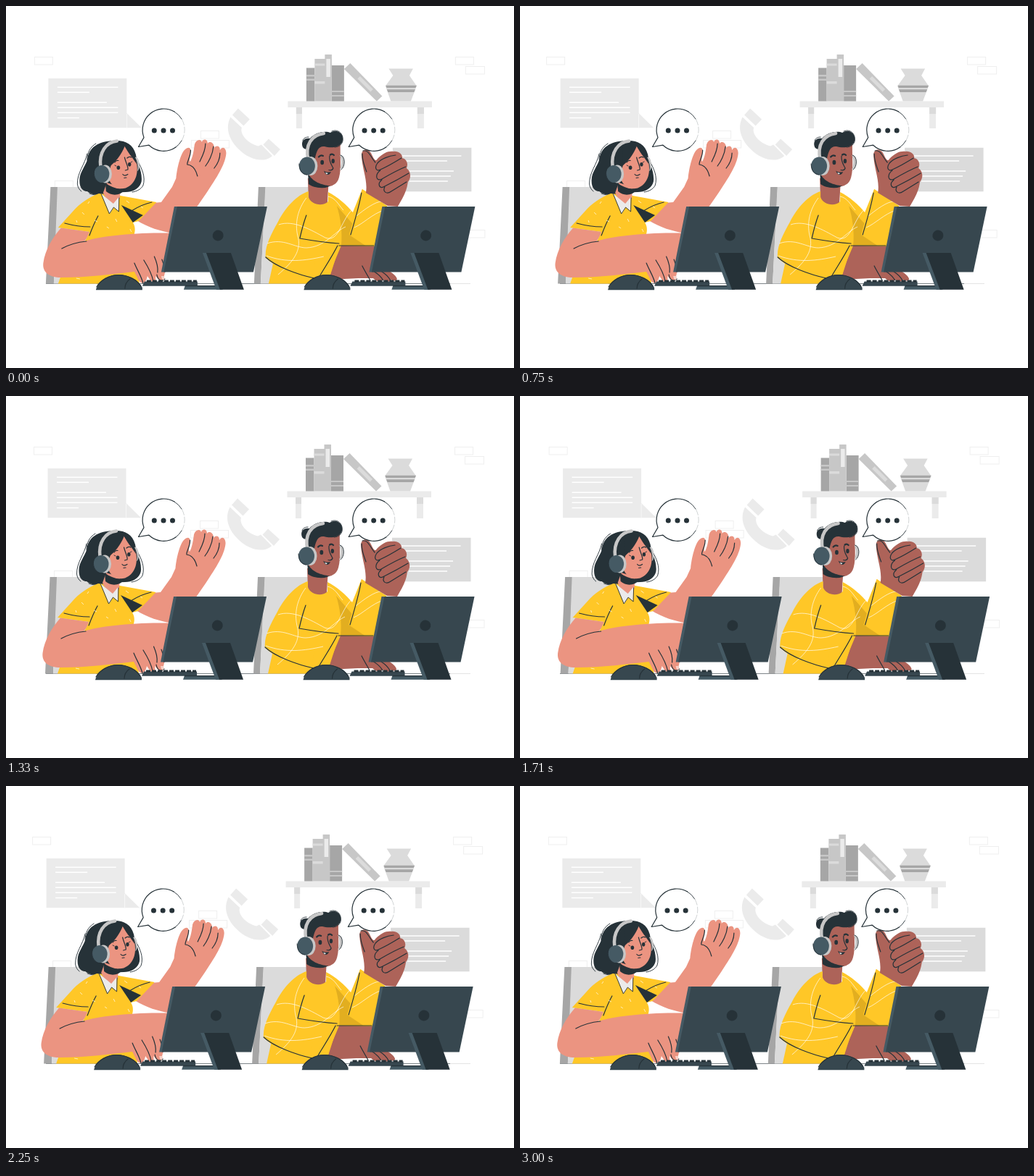
An HTML page for the animation above (3040 ms loop, 700 by 500 pixels).

```html
<!DOCTYPE html>
<html lang="en">
<head>
<meta charset="utf-8">
<title>Call center</title>
<style>
html, body { margin: 0; width: 100%; height: 100%; overflow: hidden; background: #fff; }
svg { display: block; width: 700px; height: 500px; }
.lite { fill: #ebebeb; } .pale { fill: #dbdbdb; } .mid { fill: #c7c7c7; } .grey { fill: #a6a6a6; }
.dark { fill: #263238; } .slate { fill: #37474f; } .steel { fill: #455a64; }
.sun { fill: #ffc727; } .peach { fill: #eb9481; } .brown { fill: #ad6359; }
.line { fill: none; stroke: #263238; stroke-width: 1.2; stroke-linecap: round; stroke-linejoin: round; }
.thin { stroke-width: .9; }
.rule { fill: none; stroke: #fff; stroke-width: 1.4; }
.thread { fill: none; stroke: #fff; stroke-width: .9; opacity: .75; }
.band { fill: none; stroke: #c7c7c7; stroke-width: 4.5; stroke-linecap: round; }
.box { fill: none; stroke: #efefef; }
</style>
</head>
<body>
<svg viewBox="0 0 700 500">
<defs>
  <g id="desk">
    <path class="slate" d="M191 380.5H264V386.7H188Z"/>
    <path d="M194 380H263" stroke="#263238" stroke-width="3" stroke-dasharray="6 2"/>
    <path class="steel" d="M247 386H297V391.800H245Z"/>
    <path class="dark" d="M247 386H294V387.2H247Z"/>
    <path class="steel" d="M232 277H238L220 367.5H214Z"/>
    <path class="slate" d="M236 277H360L341 367.5H217.500Z"/>
    <path class="steel" d="M271 341H279L299 391.800H290Z"/>
    <path class="dark" d="M276 341H310L328 391.800H295Z"/>
    <ellipse class="dark" cx="292.300" cy="317" rx="7.600" ry="7.300" transform="rotate(-35 292.300 317)"/>
    <path class="slate" d="M124 392.300C126 382 140 371 155 371C169 371 183 379 188 389V392.300Z"/>
    <path class="line" d="M125 388C130 379 142 371.500 155 371.500C168 371.500 181 378 186 387M171 377C167 380 164 385 164 390"/>
  </g>
  <g id="talk">
    <path d="M190 181.600L182.500 194.500L197 192.200A29.200 29.200 0 1 0 190 181.600Z" fill="#fff"/>
    <path d="M242 186A29.200 29.200 0 0 0 242 156" fill="none" stroke="#c4c8ca" stroke-width=".8" stroke-dasharray="9 2"/>
    <path class="line thin" d="M242 156A29.200 29.200 0 0 0 232 146M242 186A29.200 29.200 0 0 1 234 195"/>
    <path class="line" d="M232 146A29.200 29.200 0 0 0 190 181.600L182.500 194.500L197 192.200A29.200 29.200 0 0 0 234 195"/>
    <g class="dark"><circle cx="204.300" cy="172" r="3.500"/><circle cx="217" cy="172" r="3.500"/><circle cx="229.500" cy="172" r="3.500"/></g>
  </g>
</defs>

<path d="M55 383.500H612" stroke="#70787c" stroke-width=".9"/>
<path d="M612 383.500H640" stroke="#ddd" stroke-width=".8"/>

<g id="scene">
  <g id="frames"></g>
  <path class="lite" d="M58.500 100H166.500V148L187 168.300H58.500Z"/>
  <path d="M166.500 149V168" stroke="#fff" stroke-width=".6"/>
  <path class="rule" d="M71 112.300H154.500M71 119.300H115M71 133.300H139M71 140.300H154.500M71 147.300H154.500M71 154.500H101"/>
  <path class="pale" d="M533 195.800H641.500V256.300H533Z"/>
  <path class="rule" d="M544 207H627.500M544 214H608M554 228H617M554 235H613M556 242H609"/>

  <path class="lite" d="M388.500 131.500H587V140H576V169H567V140H408V169H400V140H388.500Z"/>
  <path class="pale" d="M400 140H408V149H400ZM567 140H576V149H567Z"/>
  <path class="grey" d="M414 85.500H425.500V131.500H414ZM449 82H466V131.500H449Z"/>
  <path class="mid" d="M414 95H425.500V97.500H414ZM414 100.500H425.500V103H414ZM449 117H466V119H449ZM449 123H466V125H449ZM425.500 73H439.500V131.500H425.500ZM439.500 67H449V131.500H439.500Z"/>
  <path class="pale" d="M425.500 79.500H439.500V82.500H425.500ZM425.500 104H439.500V107.500H425.500Z"/>
  <path class="lite" d="M441.500 73H447V98H441.500Z"/>
  <path class="mid" d="M474.500 79L518.500 124.500L511 131.500L466 87Z"/>
  <path class="pale" d="M488 97L506 115L502.500 118.500L484.500 100.500Z"/>
  <path class="pale" d="M527.500 86.500H561L556 96L566 110.500L558 131.500H530.500L523 110.500L533.500 96Z"/>
  <path class="grey" d="M523.500 109.800H566L564.500 113H524.500ZM525 115.300H564L562.500 119H526.500Z"/>

  <g class="lite">
    <path d="M320 141.500L336 156.500L327.500 165.500L312 150.500Z"/>
    <path d="M309.500 153.500L325 168C322 177 333 190 348 193.500L352 191.500L367 207C359 216 337 215 320 197C307 184 302 168 309.500 153.500Z"/>
    <path d="M362 183.500L378 198L370 207L354.500 191.500Z"/>
  </g>

  <path class="grey" d="M61.500 250H72L66 383.500H55ZM348 250H358L351 383.500H342Z"/>
  <path class="pale" d="M71 250H125V383.500H66ZM357.500 250H420V383.500H351Z"/>

  <!-- woman -->
  <g>
    <path class="dark" d="M149 186C127 187 114 195 112 213C109 222 101.500 230 101.500 240C101 251 106 256 112 256C119 262 132 262 141 258L165 257C178 257 188 249 187 238C187 226 181 218 179 205C175 190 164 185 149 186Z"/>
    <path class="line thin" d="M112 204C109 219 98 230 98.500 246C99 250 101 254 104 256M182 215C187 224 193 236 189 248C186 253 181 256 174 257M115 259C125 263 137 261 143 257M124 190C116 195 112 202 112 213"/>
    <path class="peach" d="M178 274L214 271L229 250L234.500 238C236 222 241 204 246 199C251 194 255 195 254.500 201C254 207 252 212 254 215C258 208 259 198 260 191C262 184 269 183 270 188C271 183 278 183 278 190C280 186 287 188 287 196C290 192 295 193 295 199C299 192 304 197 303.500 204C302 220 290 239 262 279L230 314C213 311 196 306 180 296Z"/>
    <path class="line" d="M254.500 199C255 208 249 215 250 219C258 220 262 227 264 235M275 190C275 200 270 209 267 215M286 194C285 205 279 216 275 221M295 203C295 211 291 219 287 224"/>
    <path class="sun" d="M128 259C115 264 102 272 92 284L72 306L115 312L108 327L76 372L72 383.500H184L176 318C179 310 178 304 175 299L183 297L207.500 271L158 262Z"/>
    <path class="dark" d="M159 275L189 289L175 299Z"/>
    <path class="line" d="M127 290C122 299 118 309 115 317M81 300C92 303 104 305 116 305M173 283C181 278 192 273 201 271"/>
    <path class="thread" d="M105 285L108 288M122 296L126 298M151 294L153 298M166 269L170 272M171 308L173 312M97 296L98 299M139 305L142 307M113 273L115 270M186 277L189 279M97 376L102 377M136 377L139 379"/>
    <path class="peach" d="M139 244L158 250L157 266L145 280L134 258Z"/>
    <path class="dark" d="M137 244C144 250 154 254 165 252C160 261 147 264 138 256Z"/>
    <path class="lite" d="M131 259L143 287L148.500 278L155 283L155.500 264L148 273Z"/>
    <path class="line thin" d="M131 259L142.500 287L148.500 278L155.500 284L156 265"/>
    <path class="peach" d="M145 219C153 211 158 201 163 193C169 203 177 207 180 216C183 231 179 246 165 251.500C153 255 142 247 141 234Z"/>
    <path class="dark" d="M144 188C158 185 173 188 176 202C178 208 180 214 180 218C174 208 167 202 164 193C159 206 151 215 144 221Z"/>
    <path class="line" d="M150 216C151 214 153 213 155 213.500M167 210C169 208 172 208 173 209M163.500 209C165 216 169 222 168 226L164.500 227M161 232.500C163 235 166 234 168 232.500M163 237.500L166 237"/>
    <g class="dark"><ellipse cx="155" cy="223.300" rx="2.300" ry="2.800"/><ellipse cx="170.300" cy="218.800" rx="2.200" ry="2.800"/></g>
    <path class="line thin" d="M152 221L150 220M172 216L174 215"/>
    <path class="band" d="M130.500 222C128 202 138 188 153 186.500"/>
    <path class="mid" d="M178 209C184 206 186 226 181 228C183 222 181 214 178 209Z"/>
    <ellipse class="mid" cx="137" cy="232" rx="9" ry="12.500"/>
    <ellipse class="steel" cx="132" cy="232" rx="10.500" ry="12"/>
    <path class="line thin" d="M122 226C120 234 123 241 129 244"/>
    <path class="peach" d="M76 306.500L115 312C113 318 111 321 108 325C130 318 182 312 232 314L218 373C220 380 212 382 208 375L206 373C208 383 202 384 197 376L195 373C193 384 186 386 182 377L177 367C149 370 113 375 76 375C60 375 50 368 51.500 355C54 337 64 320 76 306.500Z"/>
    <path class="line" d="M77 335C88 329 101 326 111 325M177 355C181 365 187 374 189 383M190 351C195 359 201 369 203 380M204.500 346C208 354 210 361 209 368M215 350L218 359M208 371C209 378 215 382 219 377"/>
    <path d="M214 373L218 373L218 379L215 377Z" fill="#f7d1c7"/>
  </g>

  <!-- man -->
  <g>
    <path class="brown" d="M416 238H445L443 272C435 278 424 275 417 267Z"/>
    <path class="dark" d="M417 233L444 246V250C434 253 422 250 417 246Z"/>
    <path class="sun" d="M417 256C401 261 385 278 375 298C365 316 356 333 358 348L368 356L362 383.500H432L508 332L525 276L491 253L478 285C470 275 456 263 444 257L444 270C436 278 420 274 417 264Z"/>
    <path d="M456 276L504 331H462C464 312 461 292 456 276Z" fill="#e2ae20"/>
    <path class="sun" d="M491 253L525 276L514 331L497 332L473 316Z"/>
    <path class="brown" d="M460 331L512 332L506 364L528 366C533 369 538 373 539 377C538 381 533 379 530 378C530 382 524 381 520 378C517 382 511 381 506 376L486 376L445 378Z"/>
    <path class="sun" d="M462 331L440 383.500H420L430 332Z"/>
    <g class="thread">
      <path d="M376 302C396 295 420 309 440 320C460 328 462 292 480 279M360 328C382 320 398 334 414 334C440 333 452 312 468 305M359 345C387 355 411 352 438 346M375 371C396 353 408 338 402 317C398 300 402 281 414 265M444 263C454 265 458 274 465 282M480 306C492 301 505 287 521 282M483 290C494 281 509 270 518 270"/>
    </g>
    <path class="line" d="M414 289C410 300 407 312 405 321C422 324 441 327 459 328M358 347C372 360 402 371 425 376M457 331C449 347 438 363 430 377M490 258C487 276 480 299 475 316M459 331H507"/>
    <path class="line" d="M491 359C495 367 499 373 502 379M506 366C513 370 517 374 520 379M518 367C523 370 527 374 530 379"/>
    <path class="brown" d="M490 206C490 197 499 196 503 203C507 211 509 216 512 211C520 203 527 200 534 201C541 200 547 205 546 210C552 211 555 218 552 224C558 228 559 237 554 243C552 258 546 266 540 277L526 276L496 258C499 241 491 226 490 206Z"/>
    <path class="line" d="M537 206C528 207 517 211 512 217C507 224 511 229 516 226C527 221 537 215 545 210M516 227C508 233 510 243 518 239C530 232 541 226 551 222M518 240C511 246 515 254 522 249C534 243 545 237 555 231M522 250C519 256 524 261 531 256L552 243M492 200C500 198 502 208 509 216M491 204C491 215 495 223 497 229"/>
    <path class="brown" d="M419 198C430 190 449 187 461 188C460 207 463 223 459 237C456 249 444 251 433 249C422 246 416 237 417 226Z"/>
    <path class="dark" d="M416 230C422 244 436 247 447 248.500C435 253 419 250 417 241Z"/>
    <path class="dark" d="M409 195C406 187 411 182 419 183C426 174 441 172 447 175C456 169 466 176 464 186C461 197 446 196 439 194C431 193 428 200 426 210L419 214L415 198C413 198 410 197 409 195Z"/>
    <path class="line thin" d="M449 173C458 169 466 177 464 187C462 193 457 195 453 195M409 186C410 182 414 181 417 181"/>
    <path class="line" style="stroke-width:2.200" d="M431 208.500C433 206 435 206 437 207M447 205.500C449 204 451 205 452 206"/>
    <g class="dark"><ellipse cx="435.800" cy="216" rx="2.400" ry="3.200"/><ellipse cx="450.800" cy="214.200" rx="2.200" ry="3.100"/></g>
    <path class="line" d="M446 207C445 215 449 220 451 224C450 227 447 227 445 226.500"/>
    <path class="dark" d="M438 227.500C441 230 445 230 448 229C446 234 441 235 438 227.500Z"/>
    <path d="M440 230L444 231L442 232.500Z" fill="#fff"/>
    <path class="band" d="M416.500 212C412 192 421 178 438 176"/>
    <path class="mid" d="M460 206C468 205 469 224 460 226C463 219 463 212 460 206Z"/>
    <path class="line thin" d="M461 206C468 207 468 222 462 226"/>
    <ellipse class="mid" cx="420" cy="221" rx="9.500" ry="13"/>
    <ellipse class="steel" cx="415" cy="221" rx="11" ry="12.500"/>
    <path class="line thin" d="M404 218C404 227 409 233 415 233"/>
  </g>

  <use href="#desk"/>
  <use href="#desk" x="286.500"/>
</g>

<g id="bubbles">
  <use href="#talk"/>
  <use href="#talk" x="289.700"/>
</g>
</svg>
<script>
const LOOP = 3040, LEAD = 20, BUBBLE_START = 2000;
const sway = [0, -1, 2, -4, 4, -4, 4, -4, 2, -1, 0];
const scene = document.getElementById('scene');
const bubbles = document.getElementById('bubbles');

// x, y and width of the faint background frames
const boxes = [[39.5, 70.5, 25], [619.5, 70.5, 25], [633.5, 83.5, 26], [268.5, 172.5, 25],
  [255.5, 185.5, 52], [67.5, 241.5, 25], [634.5, 309.5, 25.5]];
document.getElementById('frames').innerHTML = boxes.map(([x, y, w]) =>
  `<rect class="box" x="${x}" y="${y}" width="${w}" height="10.500"/>`).join('');

function shake(t, span) {
  if (t <= 0) return 0;
  const p = (t % span) / span * 10, i = Math.floor(p);
  return sway[i] + (sway[i + 1] - sway[i]) * (p - i);
}

const shift = (el, x) => el.setAttribute('transform', `translate(${x.toFixed(3)} 0)`);

function draw(now) {
  const t = now % LOOP;
  shift(scene, shake(t + LEAD, 1500));
  shift(bubbles, shake(t - BUBBLE_START, 3000));
  requestAnimationFrame(draw);
}
draw(performance.now());
</script>
</body>
</html>
```
